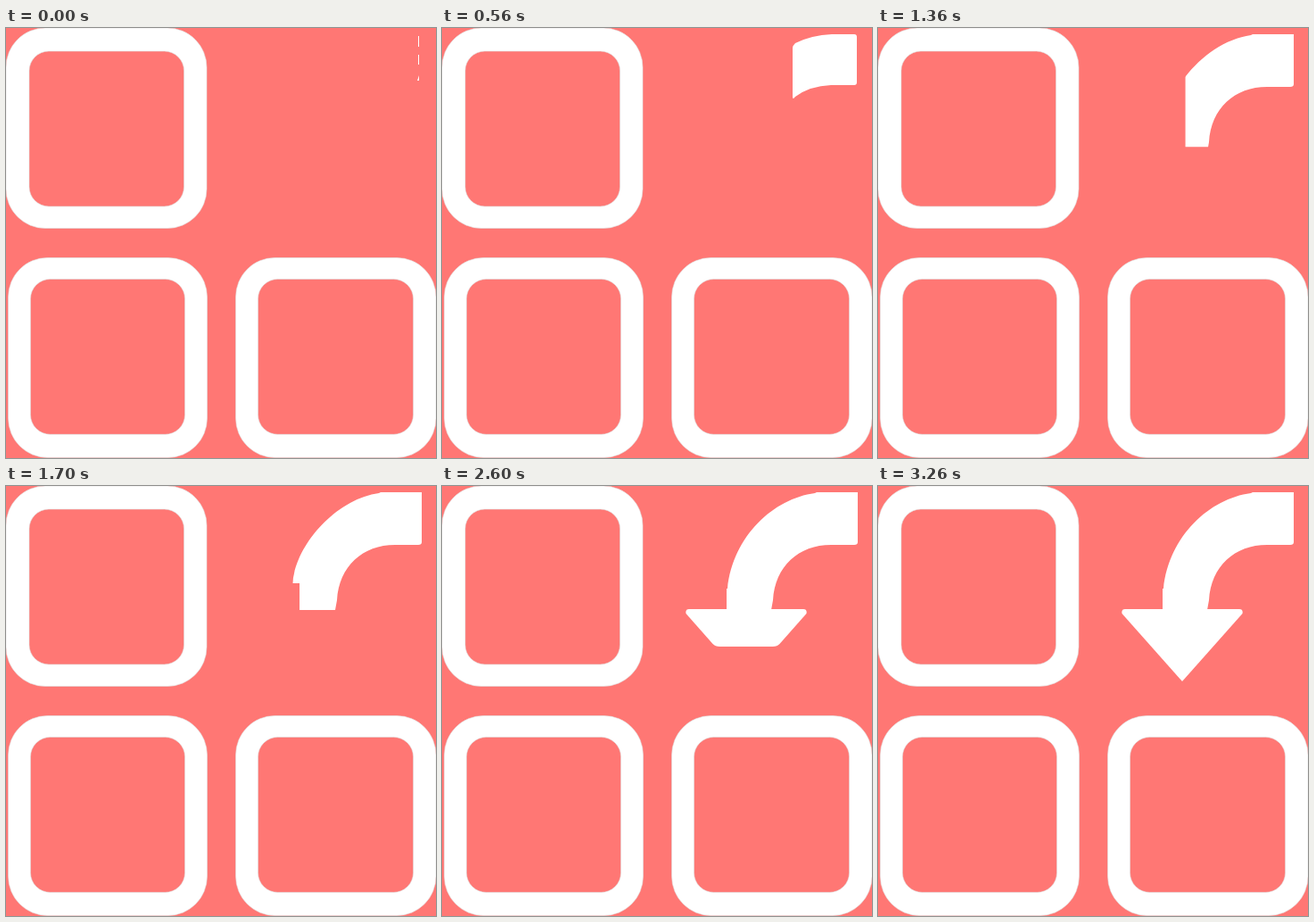
Animation of 482x482 px, one loop 3.28 s. Source, as an HTML page:

```html
<!DOCTYPE html>
<html lang="en">
<head>
<meta charset="utf-8">
<title>Tiles and arrow</title>
<style>
  html, body { margin: 0; width: 100%; height: 100%; overflow: hidden; background: #ff7774; }
  svg { display: block; width: 100%; height: 100%; }
</style>
</head>
<body>
<svg viewBox="0 0 482 482">
  <defs>
    <clipPath id="wipe"><rect id="window" y="0" width="482" height="482"/></clipPath>
  </defs>
  <g id="tiles" fill="#fff" fill-rule="evenodd" stroke="#dfdddd" stroke-width=".6"></g>
  <g fill="#fff">
    <path id="body" clip-path="url(#wipe)"/>
    <path id="head"/>
  </g>
</svg>
<script>
const LOOP = 3280, TICK = 20, STEPS = 27;
const $ = id => document.getElementById(id);
const lerp = (a, b, k) => a + (b - a) * k;

// Rounded box as a path, given its edges and corner radius
const box = (l, t, r, b, c) =>
  `M${l + c} ${t}H${r - c}Q${r - c * .28} ${t + c * .28 - c * .18} ${r - c * .2} ${t + c * .35}` +
  `Q${r} ${t + c * .62} ${r} ${t + c}V${b - c}A${c} ${c} 0 0 1 ${r - c} ${b}` +
  `H${l + c}A${c} ${c} 0 0 1 ${l} ${b - c}V${t + c}A${c} ${c} 0 0 1 ${l + c} ${t}Z`;

const round = (l, t, r, b, c) =>
  `M${l + c} ${t}H${r - c}A${c} ${c} 0 0 1 ${r} ${t + c}V${b - c}A${c} ${c} 0 0 1 ${r - c} ${b}` +
  `H${l + c}A${c} ${c} 0 0 1 ${l} ${b - c}V${t + c}A${c} ${c} 0 0 1 ${l + c} ${t}Z`;

const tiles = [
  [[0, 0, 225, 224.5], [26, 26, 199.5, 200]],
  [[2.5, 257.5, 225.5, 481.5], [27.5, 281.5, 200.5, 455.5]],
  [[257.5, 257.5, 482, 481.5], [282.5, 281.5, 456.5, 455.5]]
];
$('tiles').innerHTML = tiles.map(([outer, inner]) =>
  `<path d="${round(...outer, 44)}${round(...inner, 22)}"/>`).join('');

// step, left, top, bottom, top control x/y, top end, bottom start, bottom control x/y, right, base
const poses = [
  [0, 462, 9, 58, 463, 8, 463, 463, 463, 58, 463, 58],
  [27, 393, 20, 80, 414, 8, 437, 436, 412, 65, 465, 64],
  [50, 370, 34, 113, 395, 12, 425, 430, 392, 68, 466, 66],
  [54, 366, 37, 128, 392, 12, 424, 436, 386, 68, 466, 66]
];
const slivers = 'M462 9h1v12h-1zM462 30h1v11h-1zM461 59l2-6v6z';

function ribbon(n) {
  const i = poses.findIndex(p => p[0] >= n);
  const a = poses[i - 1], b = poses[i];
  const k = (n - a[0]) / (b[0] - a[0]);
  const [, l, t, d, tcx, tcy, tx, bx, bcx, bcy, r, base] = a.map((v, j) => lerp(v, b[j], k));
  const c = Math.min(3, (r - l) / 3);
  return `M${l} ${t + 2}Q${l} ${t} ${l + c} ${t - c}Q${tcx} ${tcy} ${tx} 7H${r - c}` +
    `Q${r} 7 ${r} ${7 + c}V${base - c}Q${r} ${base} ${r - c} ${base}H${bx}` +
    `Q${bcx} ${bcy} ${l + c} ${d - c}Q${l} ${d + 1} ${l} ${d - c}Z`;
}

// Curved shaft of the arrow; a notched one has no lower left corner yet
const shaft = notched =>
  'M466 7V63Q466 66 462 66H436C400 66 373 90 371 128L369 139' +
  (notched ? 'H329V109H321.5Q321.5 103 323 98' : 'H319V115H320') +
  (notched ? 'C332 58 374 14 418 8L420 7Z' : 'C326 56 372 14 418 8L420 7Z');

// Arrowhead drawn down to y = b, its tips pushed out by spread (0..1)
function head(b, spread) {
  if (b <= 138) return '';
  const mid = 341, l = 273.5 - 7 * spread, r = 408.5 + 11 * spread;
  if (b < 147) return `M277 138H405Q${r} 138 ${r - 1} ${Math.min(b, 143)}L402 ${b}H280L${l + 1} ${Math.min(b, 143)}Q${l} 138 277 138Z`;
  const edge = y => Math.min(mid, 274 + (y - 144) * 67 / 75);
  const x1 = edge(b - 3), x2 = edge(b), x3 = Math.min(mid, x2 + 5);
  const flip = x => 2 * mid - x;
  return `M277 138H405Q${r + 1} 138 ${r} 143L${flip(x1)} ${b - 3}Q${flip(x2)} ${b} ${flip(x3)} ${b}` +
    `H${x3}Q${x2} ${b} ${x1} ${b - 3}L${l} 143Q${l - 1} 138 277 138Z`;
}

function draw(t) {
  const n = Math.max(0, Math.floor(t / TICK) - 1);
  const phase = n ? Math.floor((n - 1) / STEPS) : 0;
  const step = n ? (n - 1) % STEPS + 1 : 0;
  const k = step / STEPS;

  let d, left = 0, floor = 482, tip = 0, spread = 0;
  if (phase < 2) {
    d = n ? ribbon(n) : slivers;
  } else if (phase === 2) {
    d = shaft(true);
    left = lerp(366, 321.5, k);
    floor = lerp(128, 139, k);
  } else {
    d = shaft(phase === 3 && step < 4);
    tip = phase === 3 ? lerp(135.3, 159.3, k) : phase === 4 ? lerp(159.3, 186, k) : lerp(186, 219, k);
    if (phase === 4) spread = Math.max(0, (21 - step) / 20);
  }
  $('body').setAttribute('d', d);
  $('window').setAttribute('x', left);
  $('window').setAttribute('height', floor);
  $('head').setAttribute('d', head(tip, spread));
}

const start = performance.now();
function loop() {
  draw((performance.now() - start) % LOOP);
  requestAnimationFrame(loop);
}
loop();
</script>
</body>
</html>
```
